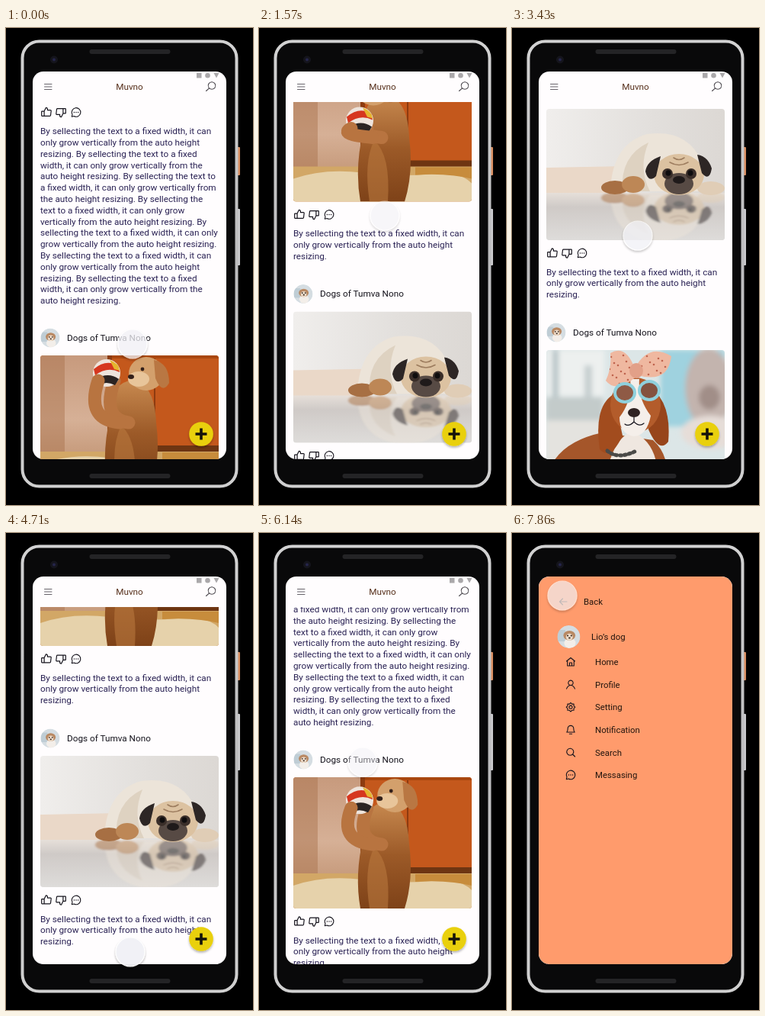
An HTML page that plays this animation: 324 px wide and 625 px high, repeating every 8 s.

```html
<!DOCTYPE html>
<html lang="en">
<head>
<meta charset="utf-8">
<title>Pet feed</title>
<style>
html, body { margin: 0; width: 100%; height: 100%; overflow: hidden; background: #000; }
svg { display: block; width: 100vw; height: 100vh; }
text { font: 11.75px Roboto, sans-serif; white-space: pre; }
.body text { fill: #2a2254; }
.menu text { font-size: 11.4px; fill: #24160f; }
.line { fill: none; stroke: #15131c; stroke-linecap: round; stroke-linejoin: round; }
</style>
</head>
<body>
<svg id="stage" viewBox="0 0 324 625" xmlns="http://www.w3.org/2000/svg"></svg>
<script>
const LOOP = 8000, STEP = LOOP / 56;
const GAP = 316, FIRST = 406;

// Shape helpers
const rect = (x, y, w, h, fill, extra = '') =>
  `<rect x="${x}" y="${y}" width="${w}" height="${h}" fill="${fill}" ${extra}/>`;
const oval = (x, y, rx, ry, fill, extra = '') =>
  `<ellipse cx="${x}" cy="${y}" rx="${rx}" ry="${ry}" fill="${fill}" ${extra}/>`;
const path = (d, fill, extra = '') => `<path d="${d}" fill="${fill}" ${extra}/>`;
const text = (x, y, s, extra = '') => `<text x="${x}" y="${y}" ${extra}>${s}</text>`;
const group = (x, y, inner, extra = '') => `<g transform="translate(${x} ${y})" ${extra}>${inner}</g>`;
const line = (d, w = 1.1, extra = '') => `<path class="line" d="${d}" stroke-width="${w}" ${extra}/>`;
const dots = [-2.6, 0, 2.6].map(x => oval(x, 0, .75, .75, '#15131c')).join('');
const bubble = line('M-5 2.8A5.8 5.8 0 1 1 -2.8 5L-5.7 5.7Z') + dots;

// Feed pieces
const thumb = line('M-2.9-1.4V4.8H-5.8a.5.5 0 0 1-.5-.5V-.9a.5.5 0 0 1 .5-.5ZM-2.9-1.4L-.5-6.2a1.9 1.9 0 0 1 1.9 1.9V-2.9H5.3A1 1 0 0 1 6.2-1.8L5.5 4a1 1 0 0 1-1 .8H-2.9', 1.2);

const sentence = 'By sellecting the text to a fixed width, it can only grow vertically from the auto height resizing.'.split(' ');

function paragraph(y, counts) {
  let n = 0;
  return '<g class="body">' + counts.map((count, i) => {
    const words = Array.from({ length: count }, () => sentence[n++ % sentence.length]);
    return text(45, y + i * 14.8, words.join(' '));
  }).join('') + '</g>';
}

const actions = (y, counts) =>
  group(53, y + 212, thumb) +
  group(72, y + 212, `<g transform="rotate(180)">${thumb}</g>`) +
  group(92, y + 212, bubble) +
  paragraph(y + 240.6, counts);

const puppy = r => group(0, 0,
  oval(0, 0, 1, 1, '#d5dde2') +
  rect(-1, -.6, .7, 1, '#a9bdc9', 'opacity=".5"') +
  oval(.1, .55, .5, .45, '#f3eee9') +
  oval(.05, -.12, .52, .42, '#b98963') +
  oval(.05, .02, .3, .3, '#ecdac8') +
  oval(-.1, -.1, .07, .07, '#33251d') + oval(.22, -.1, .07, .07, '#33251d') +
  oval(.06, .1, .09, .07, '#33251d'),
  `clip-path="url(#round)"`).replace('translate(0 0)', `scale(${r})`);

function post(i, photo, rest = '') {
  const y = FIRST + GAP * i;
  return group(58, y, puppy(12.5)) +
    text(80, y + 4, 'Dogs of Tumva Nono', 'fill="#15131c"') +
    group(45, y + 23, photo, 'clip-path="url(#photo)"') + rest;
}

// Photos, 234 x 172
const kitchen =
  rect(0, 0, 234, 172, '#c4581c') +
  rect(0, 0, 88, 140, 'url(#fridge)') +
  rect(0, 0, 32, 140, '#a66f4a', 'opacity=".45"') +
  path('M88 0H94V122H88ZM149 0H151V122H149Z', '#8d3b10') +
  rect(94, 0, 140, 4, '#a9470f') +
  rect(88, 118, 146, 10, '#6e3512') +
  rect(0, 126, 234, 46, '#d2a766') +
  path('M0 142Q40 128 90 134T180 136T234 148V172H0Z', '#e6d2ab') +
  path('M160 127H234V142Q200 134 160 137Z', '#c78c3c') +
  path('M88 172Q80 128 92 78Q90 36 122 32Q150 38 152 88Q158 134 146 172Z', 'url(#fur)') +
  path('M100 172Q92 120 106 92Q128 110 124 172Z', '#b9783f', 'opacity=".6"') +
  '<g id="arms"></g>';

const pugShape =
  path('M84 108Q86 46 132 33Q186 26 204 70L200 108Z', '#ece4d9') +
  path('M100 108Q96 62 134 44Q120 78 136 108Z', '#d9cab8', 'opacity=".7"') +
  oval(90, 103, 18, 9, '#a76f43') + oval(114, 99, 15, 11, '#bd8756') +
  oval(216, 104, 18, 9, '#e0cdb6') +
  oval(174, 86, 33, 27, '#dcc2a1') +
  path('M150 62Q132 68 130 82Q134 98 144 88ZM198 60Q212 62 217 78Q214 96 204 84Z', '#2d2625') +
  oval(174, 98, 19, 14, '#574a44') + oval(174, 93, 8, 5, '#1f1a1a') +
  oval(159, 85, 7, 7, '#3a2e29') + oval(190, 85, 7, 7, '#3a2e29') +
  oval(160, 84, 3.5, 3.8, '#0f0d0e') + oval(189, 84, 3.5, 3.8, '#0f0d0e') +
  line('M162 70Q174 77 186 70M167 64Q174 69 181 64', 1.6, 'style="stroke:#9d7d5f"');

const pug =
  rect(0, 0, 234, 172, 'url(#wall)') +
  path('M0 77L104 75V112H0Z', '#ead8c8') +
  rect(0, 110, 234, 62, 'url(#floor)') +
  `<g transform="matrix(1 0 0 -.8 0 199)" opacity=".5" filter="url(#soft)">${pugShape}</g>` +
  pugShape;

const bowDots = Array.from({ length: 34 }, (_, i) =>
  oval(80 + (i * 29) % 78, 6 + (i * 17) % 40, 1.3, 1.3, '#c0644e')).join('');

const spaniel =
  rect(0, 0, 234, 172, '#dce6e7') +
  `<g filter="url(#blur)">` +
  rect(0, 0, 76, 60, '#edf0ef') + rect(8, 0, 8, 90, '#b8c5c8') + rect(50, 20, 10, 70, '#c6cfd0') +
  rect(0, 62, 74, 30, '#c3cbca') + rect(0, 92, 80, 80, '#e4e3df') +
  rect(150, 0, 84, 100, '#9fd2df') + oval(213, 50, 31, 52, '#c3b4ae') + oval(214, 62, 14, 16, '#a18e88') +
  oval(215, 108, 38, 22, '#e6ddd8') + '</g>' +
  path('M0 172Q8 122 74 108L140 118Q162 138 158 172Z', '#a5562a') +
  path('M78 172Q84 120 112 106Q148 122 146 172Z', '#efe7e0') +
  path('M88 58Q62 74 70 130Q84 146 100 112Z', '#a24c1e') +
  path('M142 54Q164 74 160 120Q148 136 134 104Z', '#97451b') +
  oval(117, 72, 33, 36, '#b35c2b') +
  path('M110 38H122Q120 64 137 86Q132 112 115 113Q96 110 96 88Q113 66 110 38Z', '#f5efea') +
  oval(115, 82, 8, 6, '#2e2222') + line('M115 88V94Q108 101 103 97M115 94Q122 101 128 96', 1.2) +
  path('M84 4Q104-8 116 24Q134-10 164 8Q160 44 120 33Q92 58 78 40Q86 24 84 4Z', '#efb8a0') +
  `<g clip-path="url(#bow)">${bowDots}</g>` +
  oval(118, 27, 9, 10, '#e2a088') +
  oval(103, 56, 13, 12, '#8f5a45', 'stroke="#8fd0dc" stroke-width="4"') +
  oval(135, 53, 13, 12, '#84523f', 'stroke="#8fd0dc" stroke-width="4"') +
  line('M80 132Q94 144 118 132', 5, 'style="stroke:#4b4a48" stroke-dasharray="2 4"');

// Menu
const house = 'M-5.5-1L0-5.5L5.5-1M-4.3-2V5H4.3V-2M-1.5 5V1H1.5V5';
const person = 'M0-5.5a3.2 3.2 0 1 1-.01 0M-5.5 5.5Q-3.5 .9 0 .9T5.5 5.5';
const bell = 'M-5.2 3.2Q-3.8 1.5-3.8-1.6a3.8 3.8 0 0 1 7.6 0Q3.8 1.5 5.2 3.2ZM-1.6 5.5H1.6';
const lens = 'M-.7-5.2a4.5 4.5 0 1 1-.01 0M2.6 2.6L5.6 5.6';
const gear = line('M0-2.1a2.1 2.1 0 1 1-.01 0') +
  line(Array.from({ length: 17 }, (_, i) => {
    const a = i * Math.PI / 8, r = i % 2 ? 4.4 : 5.8;
    return `${i ? 'L' : 'M'}${(r * Math.cos(a)).toFixed(2)} ${(r * Math.sin(a)).toFixed(2)}`;
  }).join(''));
const items = [['Home', line(house)], ['Profile', line(person)], ['Setting', gear],
  ['Notification', line(bell)], ['Search', line(lens)], ['Messasing', bubble]];

const menu = rect(35, 57, 254, 508, '#ff9b6c', 'rx="14"') +
  line('M72 90H62.5M66.5 86L62.5 90L66.5 94', 1.1, 'style="stroke:#5d4336"') +
  text(94, 94, 'Back') +
  group(74.5, 136, puppy(15)) + text(104, 140.2, 'Lio’s dog') +
  items.map(([name, icon], i) =>
    group(77, 169 + i * 29.6, icon) + text(109, 173.2 + i * 29.6, name)).join('');

const stops = (...list) => list.map(([o, c]) => `<stop offset="${o}" stop-color="${c}"/>`).join('');
const gradient = (id, list, dir = 'x2="0" y2="1"') =>
  `<linearGradient id="${id}" ${dir}>${stops(...list)}</linearGradient>`;

document.getElementById('stage').innerHTML = `<defs>
  <clipPath id="round"><circle r="1"/></clipPath>
  <clipPath id="photo"><rect width="234" height="172" rx="4"/></clipPath>
  <clipPath id="bow"><path d="M84 4Q104-8 116 24Q134-10 164 8Q160 44 120 33Q92 58 78 40Q86 24 84 4Z"/></clipPath>
  <clipPath id="screen"><rect x="35" y="57" width="254" height="508" rx="14"/></clipPath>
  <clipPath id="list"><rect x="35" y="97" width="254" height="468"/></clipPath>
  <filter id="soft"><feGaussianBlur stdDeviation="1.5"/></filter>
  <filter id="blur"><feGaussianBlur stdDeviation="3"/></filter>
  <filter id="drop" x="-40%" y="-40%" width="180%" height="180%">
    <feDropShadow dx="0" dy="2" stdDeviation="1.8" flood-opacity=".3"/></filter>
  ${gradient('metal', [[0, '#d2d2d2'], [.5, '#bcbcbe'], [1, '#d0d0d0']])}
  ${gradient('fridge', [[0, '#c79a7d'], [.6, '#d6b096'], [1, '#c39676']])}
  ${gradient('fur', [[0, '#c88a50'], [.5, '#9c5a28'], [1, '#7e4218']])}
  ${gradient('wall', [[0, '#f0eeec'], [.6, '#e2dfdc'], [1, '#dcd8d4']], 'x2="1" y2="0"')}
  ${gradient('floor', [[0, '#e6dfd9'], [.3, '#cfcac7'], [1, '#dedcda']])}
</defs>` +
  rect(0, 0, 324, 625, '#000') +
  rect(303, 156, 4, 37, '#d88d60', 'rx="1"') +
  rect(303, 237, 4, 74, '#c9c9cc', 'rx="1"') +
  rect(21.5, 17.5, 281, 583, '#09090a', 'rx="22" stroke="url(#metal)" stroke-width="4"') +
  rect(109.5, 28, 106, 6, '#242426', 'rx="3"') +
  rect(109.5, 584, 106, 6, '#242426', 'rx="3"') +
  oval(63, 41.5, 5, 5, '#15151c') + oval(63, 41.5, 2, 2, '#25254a') +
  '<g clip-path="url(#screen)">' +
  rect(35, 57, 254, 508, '#fffdfe') +
  '<g clip-path="url(#list)"><g id="feed">' +
  actions(FIRST - 507.5, [10, 7, 8, 8, 8, 9, 7, 9, 7, 10, 7, 10, 7, 8, 8, 3]) +
  post(0, kitchen, actions(FIRST, [10, 7, 1])) +
  post(1, pug, actions(FIRST + GAP, [10, 7, 1])) +
  post(2, spaniel) + '</g></g>' +
  rect(250, 59, 6.5, 6.5, '#aaa8aa') + oval(264.5, 62.2, 3.3, 3.3, '#aaa8aa') +
  path('M272.5 59H279.5L276 65.5Z', '#aaa8aa') +
  line('M50.5 73.5H60M50.5 77H60M50.5 80.5H60', 1, 'style="stroke:#67636a"') +
  text(162, 81, 'Muvno', 'text-anchor="middle" fill="#57301c"') +
  line('M270-4.8a4.8 4.8 0 1 1-.01 0M266.6 3.4L262.5 7', 1.1, 'transform="translate(0 75.5)" style="stroke:#4a464c"') +
  '<g filter="url(#drop)">' + oval(256, 532, 15.8, 15.8, '#e9d00a') + '</g>' +
  path('M254.2 524.5h3.6v5.7h5.7v3.6h-5.7v5.7h-3.6v-5.7h-5.7v-3.6h5.7Z', '#15130a') +
  `<g id="menu" class="menu">${menu}</g></g>` +
  '<g id="touch"><g filter="url(#drop)">' +
  oval(0, 0, 19, 19, '#f1f1f6', 'stroke="#fff" stroke-width="1.2"') + '</g></g>';

const [feed, arms, drawer, touch] = ['feed', 'arms', 'menu', 'touch'].map(id => document.getElementById(id));

// Keys are [time, ...values]; each span eases in and out
const scrollKeys = [[0, 0], [700, 190], [1571, 373.5], [2571, 586.5], [3429, 639], [4714, 453],
  [5350, 270], [6143, 109], [6700, 95]];
const touchKeys = [[0, 166, 414, .76], [600, 166, 255, .7], [900, 165, 400, .3], [1571, 165, 246, .5],
  [2000, 160, 400, .5], [2571, 152, 247, .28], [3000, 160, 390, .5], [3429, 165, 272, .75],
  [3750, 164, 300, .8], [4714, 163, 549, .97], [5200, 158, 330, .4], [5750, 155, 530, .8],
  [6143, 136, 300, .45], [6860, 90, 130, .4], [7050, 56, 78, .75], [7350, 56, 78, .75], [7857, 66, 82, .68]];
const slideKeys = [[7150, -256], [7500, 0]];

function at(keys, t) {
  const i = keys.findIndex(k => k[0] > t);
  if (i === 0) return keys[0].slice(1);
  if (i < 0) return keys[keys.length - 1].slice(1);
  const a = keys[i - 1], b = keys[i], u = (t - a[0]) / (b[0] - a[0]), e = u * u * (3 - 2 * u);
  return a.slice(1).map((v, j) => v + (b[j + 1] - v) * e);
}

function playArms(t) {
  const c = Math.cos(t * 3 * Math.PI / 1571), x = 87, y = 44.5 - 21.5 * c, hx = 122 + 17 * c;
  const limb = (from, dx) => line(`M${from} 88Q${70 + dx} 84 ${x + dx} ${y + 10}`, 17, 'style="stroke:#b87440"');
  arms.innerHTML =
    limb(116, 10) +
    oval(hx, 24, 23, 22, '#d3a06c') +
    path(`M${hx + 10} 6q20 4 20 30q-9 16-18-6Z`, '#b97743') +
    oval(hx - 10, 31, 14, 10, '#e8c59a') +
    oval(hx - 20, 28, 4, 3, '#33201a') + oval(hx - 5, 18, 2.4, 2.4, '#33201a') +
    oval(x, y, 18, 18, '#eee4dc') +
    path(`M${x - 17} ${y - 5}q17-14 32-4l2 8q-16-8-32 4Z`, '#d6371f') +
    path(`M${x - 14} ${y + 8}q16-10 30 0l-5 8q-12-6-21 0Z`, '#2b2422') +
    path(`M${x + 4} ${y - 17}q12 4 13 14l-7-2Z`, '#e6b52e') +
    limb(104, -11);
}

function draw(now) {
  const t = Math.floor((now % LOOP + 5) / STEP) % 56 * STEP;
  const [x, y, alpha] = at(touchKeys, t);
  feed.setAttribute('transform', `translate(0 ${-at(scrollKeys, t)[0]})`);
  drawer.setAttribute('transform', `translate(${at(slideKeys, t)[0]} 0)`);
  touch.setAttribute('transform', `translate(${x} ${y})`);
  touch.setAttribute('opacity', alpha);
  playArms(t);
}

const start = performance.now();
function tick() {
  draw(performance.now() - start);
  requestAnimationFrame(tick);
}
tick();
</script>
</body>
</html>
```
